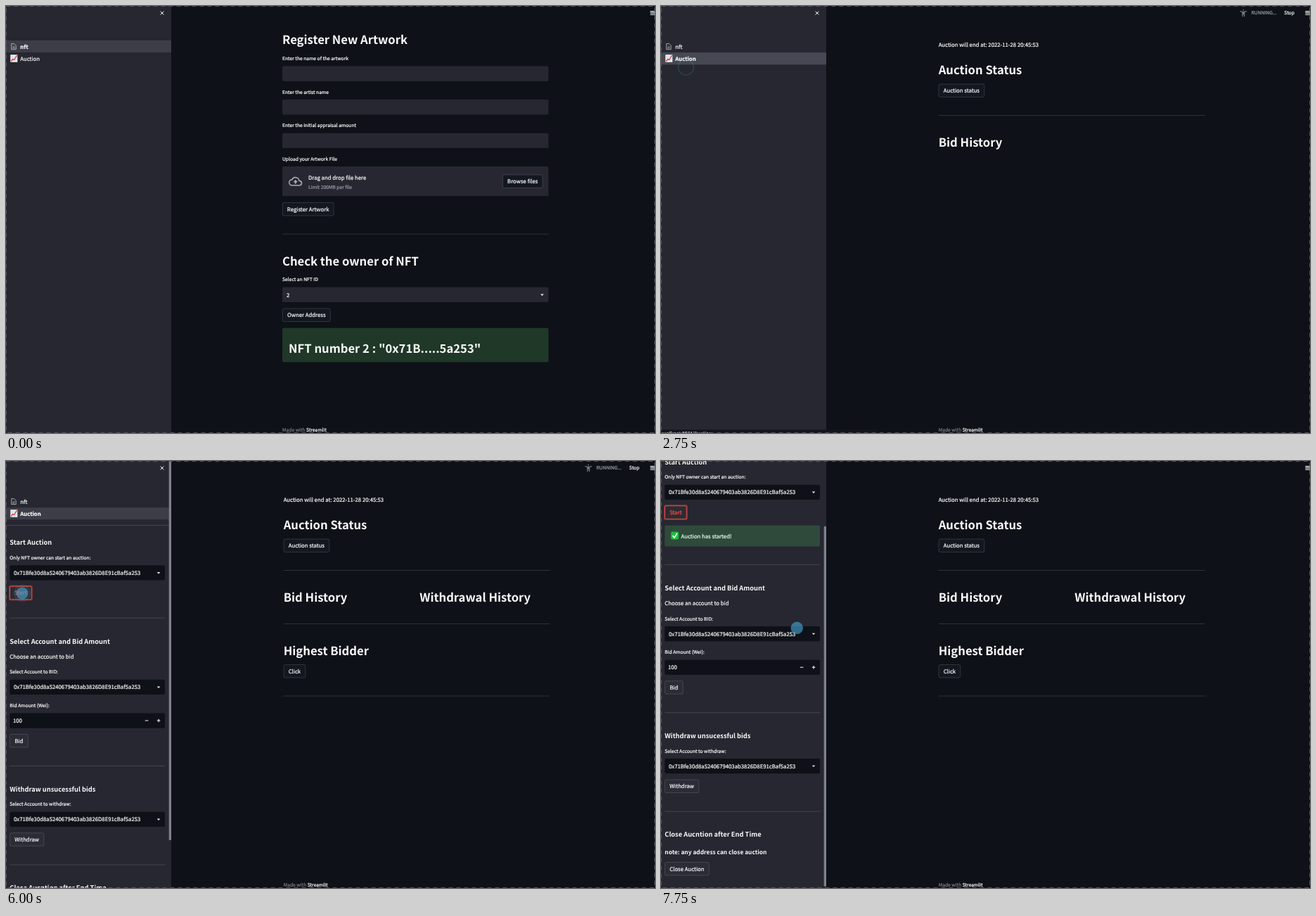
Write an HTML page that moves like this. It is 923x607 px and loops after 8000 ms.

```html
<!DOCTYPE html>
<html lang="en">
<head>
<meta charset="utf-8">
<title>NFT auction</title>
<style>
html, body { margin: 0; width: 100%; height: 100%; overflow: hidden; background: #0e1117; }
svg { display: block; width: 923px; height: 607px; }
text {
  font-family: "Noto Sans CJK JP", "Noto Sans CJK SC", "Noto Sans CJK", Lato, sans-serif;
  text-rendering: geometricPrecision;
  white-space: pre;
}
</style>
</head>
<body>
<svg id="stage" viewBox="0 0 923 607" xmlns="http://www.w3.org/2000/svg"></svg>
<script>
const LOOP = 8000, STEP = 250;
const DARK = '#0e1117', PANEL = '#262730', WHITE = '#fafafa', GREY = '#9a9ca4', RED = '#f4503f';
const ADDRESS = '0x71Bfe30d8a5240679403ab3826D8E91cBaf5a253';
const BODY = 7.75, SMALL = 6.74, TITLE = 16.65, HEAD = 9.3;

// y is the middle of the capitals; a hairline stroke thickens the regular weight
const text = (x, y, s, size = BODY, { fill = WHITE, bold, mid, id } = {}) =>
  `<text x="${x}" y="${y + size * 0.367}" font-size="${size}" fill="${fill}"` +
  ` font-weight="${bold ? 600 : 400}" text-anchor="${mid ? 'middle' : 'start'}"` +
  `${bold ? '' : ` stroke="${fill}" stroke-width=".22"`}${id ? ` id="${id}"` : ''}>${s}</text>`;
const bold = (x, y, s, size) => text(x, y, s, size, { bold: true });
const title = (x, y, s) => bold(x, y, s, TITLE);
const box = (x, y, w, h, fill, extra = '') =>
  `<rect x="${x}" y="${y}" width="${w}" height="${h}" rx="2" fill="${fill}" ${extra}/>`;
const rule = (x, y, w) =>
  `<path d="M${x} ${y}h${w}" stroke="${WHITE}" stroke-opacity=".2" stroke-width=".7"/>`;
const button = (x, y, w, s, fill = '#131720', h = 18.5) =>
  box(x, y, w, h, fill, `stroke="${WHITE}" stroke-opacity=".2" stroke-width=".7"`) +
  text(x + w / 2, y + h / 2, s, BODY, { mid: true });
const caret = (x, y) => `<path d="M${x - 2.3} ${y - 1}h4.6l-2.3 2.4z" fill="${WHITE}"/>`;
const group = (id, body) => `<g id="${id}">${body}</g>`;
const footer = x => text(x, 602.9,
  `Made with <tspan fill="${WHITE}" stroke="${WHITE}">Streamlit</tspan>`, SMALL, { fill: '#777980' });

// main pages
const WIDE = 378.6;
const field = (y, label) => text(393, y, label, SMALL) + box(393, y + 10.7, WIDE, 21.3, PANEL);
const register =
  title(393, 48.3, 'Register New Artwork') +
  field(74.9, 'Enter the name of the artwork') +
  field(122.4, 'Enter the artist name') +
  field(170, 'Enter the initial appraisal amount') +
  text(393, 217.5, 'Upload your Artwork File', SMALL) +
  box(393, 228, WIDE, 42.3, PANEL) +
  `<g transform="translate(402 239.6) scale(.81)" fill="none" stroke="#a9abb1" stroke-width="2">
    <path d="M6 19h13a4 4 0 0 0 .6-7.9l-1.1-.1-.2-.8A6.5 6.5 0 0 0 6.2 8.5l-.3.5A5 5 0 0 0 6 19z"/>
    <path d="M8 13h2.6v3h2.8v-3H16l-4-4z" fill="#a9abb1" stroke="none"/></g>` +
  text(430, 243.7, 'Drag and drop file here') +
  text(430, 257.3, 'Limit 200MB per file', SMALL, { fill: GREY }) +
  button(706.5, 240, 56.5, 'Browse files') +
  button(393.3, 279.5, 72.8, 'Register Artwork') +
  rule(393, 324.2, WIDE) +
  title(393, 362.5, 'Check the owner of NFT') +
  text(393, 389, 'Select an NFT ID', SMALL) +
  box(393, 399.8, WIDE, 21.3, PANEL) + text(399, 410.7, '2') + caret(762.5, 410.5) +
  button(393.3, 430, 68, 'Owner Address') +
  box(393, 457.8, WIDE, 48.5, '#203828') +
  title(402, 486.7, 'NFT number 2 : "0x71B.....5a253"') +
  footer(393);

const auction =
  text(394.7, 55, 'Auction will end at: 2022-11-28 20:45:53') +
  title(394.7, 91, 'Auction Status') +
  button(395, 111, 64.8, 'Auction status') +
  rule(394.7, 155.5, WIDE) +
  title(394.7, 194, 'Bid History') +
  footer(394.7);
const auctionRest =
  title(588.2, 194, 'Withdrawal History') +
  rule(394.7, 231.5, WIDE) +
  title(394.7, 269.5, 'Highest Bidder') +
  button(395, 289.5, 30.8, 'Click') +
  rule(394.7, 334, WIDE);

// sidebar
const SIDE_BTN = '#2b2c36';
const select = (y, label) => text(5.3, y, label, SMALL) +
  box(5.3, y + 10.7, 220.7, 21.3, DARK) + text(11, y + 21.5, ADDRESS) + caret(217, y + 21.5);
const sideRule = y => rule(5.3, y, 220.7);
const nav =
  '<rect id="row" width="235" height="17" fill="#3c3d47"/>' +
  '<rect id="hover" y="66.2" width="235" height="17" fill="#464854"/>' +
  `<path d="M219.6 7.6l4.8 4.8m0-4.8l-4.8 4.8" stroke="${WHITE}" stroke-width="1"/>` +
  `<path d="M7.7 53.6h3.8l2.7 2.7v5.4H7.7zM9.2 57.9h3.4M9.2 59.8h3.4" fill="none" stroke="#c6c7cb" stroke-width=".8"/>` +
  text(20.3, 58, 'nft', BODY, { id: 'navNft' }) +
  `<rect x="6.3" y="69.2" width="10" height="10.6" fill="#eef0f0"/>
   <path d="M6.3 72.7h10m-10 3.5h10M9.6 69.2v10.6m3.4-10.6v10.6" stroke="#b9cdd3" stroke-width=".5"/>
   <path d="M7.2 78.8l2.4-3.4 1.9 1.2 4.2-6.6" fill="none" stroke="#d9383a" stroke-width="1.2"/>` +
  text(20.3, 75.2, 'Auction', BODY, { id: 'navAuction' });
const form =
  rule(0, 91.5, 235) +
  bold(5.3, 116, 'Start Auction', HEAD) +
  select(137.5, 'Only NFT owner can start an auction:') +
  button(5.6, 178.3, 30.6, 'Start', SIDE_BTN) +
  group('hot',
    box(4.9, 177.6, 32, 19.9, 'none', `id="focus" stroke="${RED}" stroke-opacity=".5" stroke-width="1.7"`) +
    box(5.6, 178.3, 30.6, 18.5, SIDE_BTN, `stroke="${RED}" stroke-width=".8"`) +
    text(20.9, 187.55, 'Start', BODY, { mid: true, fill: RED })) +
  group('success',
    box(5.3, 206, 220.7, 30, '#2f4a3b') +
    box(14.2, 215, 11, 11, '#17c23b') +
    '<path d="M16.6 220.6l2.4 3 4-6.3" fill="none" stroke="#fff" stroke-width="1.7"/>' +
    text(28.6, 221.3, 'Auction has started!', BODY, { fill: '#dffde9' }));
const formLow =
  sideRule(223.2) +
  bold(5.3, 256.3, 'Select Account and Bid Amount', HEAD) +
  text(5.3, 278, 'Choose an account to bid') +
  select(300, 'Select Account to BID:') +
  text(5.3, 347.8, 'Bid Amount (Wei):', SMALL) +
  box(5.3, 358.5, 220.7, 21.3, DARK) + text(10, 369.3, '100') +
  `<path d="M197.8 369h4.6m12.4 0h4.6m-2.3-2.3v4.6" stroke="${WHITE}" stroke-width="1.1"/>` +
  button(5.6, 388.5, 25.6, 'Bid', SIDE_BTN) +
  sideRule(433.5) +
  bold(5.3, 466.5, 'Withdraw unsucessful bids', HEAD) +
  select(488, 'Select Account to withdraw:') +
  button(5.6, 528.8, 48.2, 'Withdraw', SIDE_BTN) +
  sideRule(574) +
  bold(5.3, 606.8, 'Close Aucntion after End Time', HEAD) +
  bold(5.3, 632, 'note: any address can close auction', 8.35) +
  button(5.6, 646.3, 62.6, 'Close Auction', SIDE_BTN);

const running =
  `<g stroke="#777980" stroke-width="1.3" fill="none" stroke-linecap="round">
    <circle cx="828.3" cy="5.6" r=".9" fill="#777980" stroke="none"/>
    <path d="M824 7.6l3 .8h2.6l3-.8M827 8.4v6.2m2.6-6.2v6.2M828.3 8.4v3"/></g>` +
  text(839.5, 10, 'RUNNING...', SMALL, { fill: GREY }) + text(886.3, 10, 'Stop', SMALL);

document.getElementById('stage').innerHTML =
  `<rect width="923" height="607" fill="${DARK}"/>` +
  group('register', register) + group('auction', auction) + group('auctionRest', auctionRest) +
  group('running', running) +
  `<path d="M916.3 7.6h7m-7 2.3h7m-7 2.3h7" stroke="${WHITE}" stroke-width="1.1"/>` +
  `<rect width="235" height="607" fill="${PANEL}"/>` +
  group('side', nav + group('form', form + group('formLow', formLow))) +
  '<rect id="thumb" x="231.7" width="3.3" rx="1.2" fill="#80828b"/>' +
  group('status', '<rect y="602.3" width="308" height="5" fill="#14151b"/>' +
    bold(-1.5, 607.6, 'localhost:8501/Auction', 6.5)) +
  '<rect x=".5" y=".5" width="922" height="606" fill="none" stroke="#555761" stroke-width=".9" stroke-dasharray="6 5"/>' +
  '<circle id="cursor" r="8.7" fill="#47a0d0" fill-opacity=".65"/>' +
  '<circle id="ring" fill="none" stroke="#4d9cc4" stroke-width="1.5"/>';

const el = {};
document.querySelectorAll('[id]').forEach(n => { el[n.id] = n; });
const set = (id, attrs) => { for (const k in attrs) el[id].setAttribute(k, attrs[k]); };
const show = (id, on) => set(id, { visibility: on ? 'visible' : 'hidden' });

const MOVES = [
  [250, 430, 446], [1250, 36, 77], [1500, 35, 76], [2000, 35.5, 87], [4000, 35.5, 87],
  [5000, 100.5, 176], [5500, 23, 188], [6250, 23, 188], [6750, 126, 218.3],
  [7250, 126, 218.3], [7750, 193.3, 237.3]
];
const SCROLL = [[6750, 0], [7000, 14], [7250, 52.6], [7500, 96], [7750, 114.5]];
const CLICKS = [[2500, 35.5, 87], [5750, 23, 188]];

function along(keys, t, col, ease) {
  if (t <= keys[0][0]) return keys[0][col];
  const i = keys.findIndex(k => k[0] > t);
  if (i < 0) return keys[keys.length - 1][col];
  const a = keys[i - 1], b = keys[i], u = (t - a[0]) / (b[0] - a[0]);
  return a[col] + (b[col] - a[col]) * (ease ? u * u * (3 - 2 * u) : u);
}

function draw(t) {
  const within = (a, b = LOOP) => t >= a && t < b;
  const onAuction = t >= 2750, loaded = t >= 3000, started = t >= 6250;
  show('register', !onAuction);
  show('auction', onAuction);
  show('auctionRest', loaded);
  show('running', within(2750, 3250) || within(6000, 6500));

  set('row', { y: onAuction ? 66.2 : 49 });
  show('hover', within(1750, 4250));
  set('navNft', { 'font-weight': onAuction ? 400 : 600 });
  set('navAuction', { 'font-weight': onAuction ? 600 : 400 });
  show('status', within(1750, 4250));

  const scroll = along(SCROLL, t, 1);
  set('side', { transform: `translate(0 ${-scroll})` });
  set('form', { display: loaded ? 'inline' : 'none' });
  set('formLow', { transform: `translate(0 ${started ? 38.7 : 0})` });
  show('hot', t >= 5500);
  show('focus', t >= 5750);
  show('success', started);
  show('thumb', loaded);
  set('thumb', { y: scroll * 0.81, height: started ? 512 : 539 });

  show('cursor', within(250, 2750) || within(4000));
  set('cursor', { cx: along(MOVES, t, 1, true), cy: along(MOVES, t, 2, true) });
  const click = CLICKS.find(c => within(c[0], c[0] + 2 * STEP));
  show('ring', click);
  if (click) {
    const late = (t - click[0]) / STEP;
    set('ring', { cx: click[1], cy: click[2], r: 9 + 2 * late, opacity: 0.7 - 0.48 * late });
  }
}

const begin = performance.now();
function tick() {
  const t = (performance.now() - begin) % LOOP;
  draw(t - t % STEP);
  requestAnimationFrame(tick);
}
tick();
</script>
</body>
</html>
```
